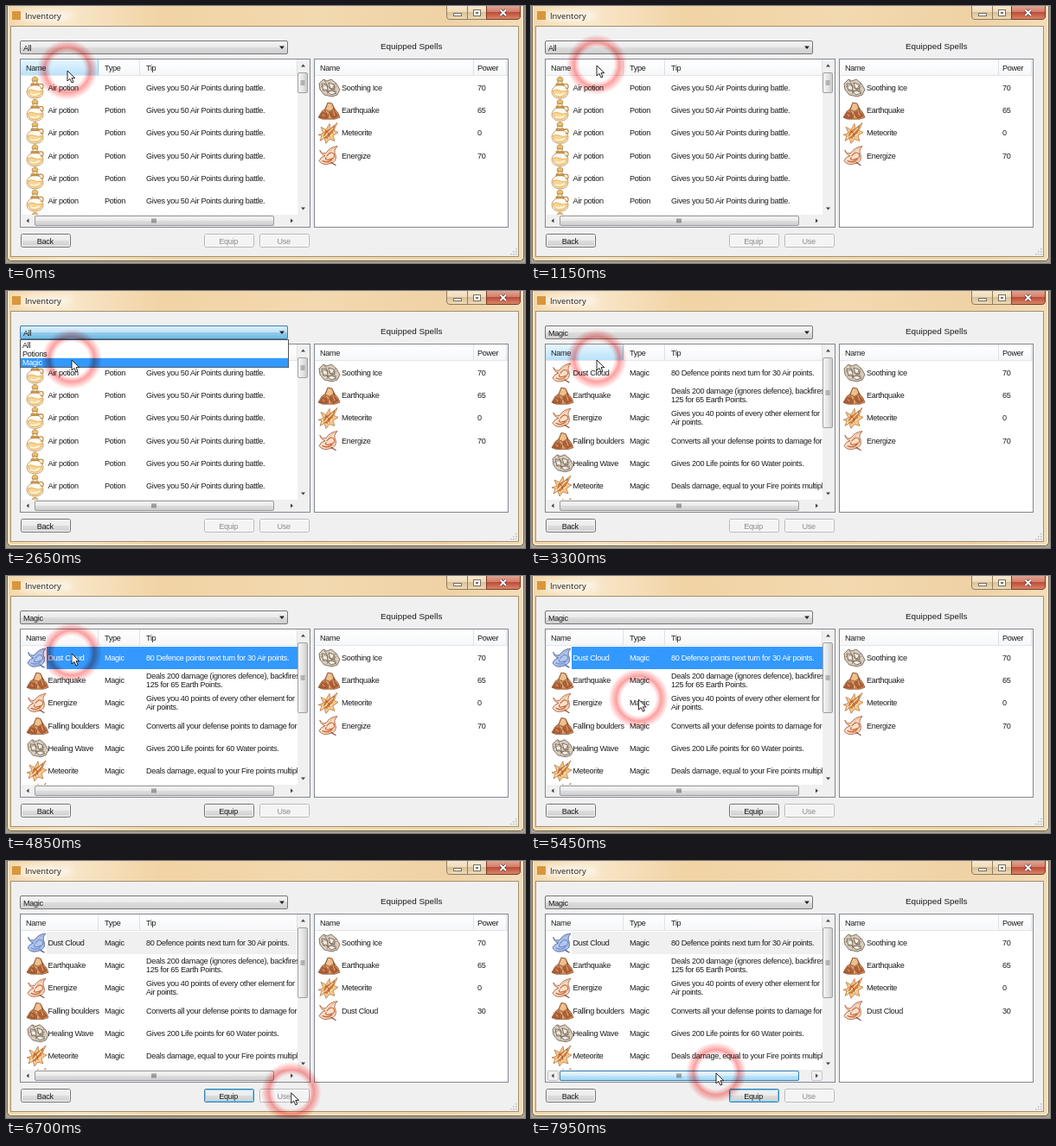
Recreate the animation shown at these times as an HTML page. Size 600 by 298 pixels, loop 8 s.

```html
<!DOCTYPE html>
<html lang="en">
<head>
<meta charset="utf-8">
<title>Inventory</title>
<style>
html, body { margin: 0; width: 100%; height: 100%; overflow: hidden; }
svg { display: block; width: 100%; height: 100%; }
text { font: 9.1px "Liberation Sans", Arial, sans-serif; letter-spacing: -.31px; fill: #1c1c1c; white-space: pre; }
.title { font: 9.4px "Open Sans", sans-serif; letter-spacing: 0; }
.label { font-size: 9.9px; letter-spacing: 0; }
.mid { text-anchor: middle; }
.off { fill: #8d8d8d; }
.lit text { fill: #fff; }
.halo { mix-blend-mode: multiply; }
</style>
</head>
<body>
<svg id="stage" viewBox="0 0 600 298" preserveAspectRatio="none">
<defs>
  <linearGradient id="glass">
    <stop stop-color="#f3d6a8"/><stop offset=".12" stop-color="#f8e6c9"/><stop offset=".3" stop-color="#f1d3a4"/>
    <stop offset=".6" stop-color="#f3d9b0"/><stop offset=".85" stop-color="#efd2a5"/><stop offset="1" stop-color="#f3ddb9"/>
  </linearGradient>
  <linearGradient id="gray" x2="0" y2="1">
    <stop stop-color="#f3f3f3"/><stop offset=".5" stop-color="#ebebeb"/><stop offset=".5" stop-color="#dddddd"/><stop offset="1" stop-color="#cfcfcf"/>
  </linearGradient>
  <linearGradient id="blue" x2="0" y2="1">
    <stop stop-color="#eaf6fd"/><stop offset=".5" stop-color="#d5edfb"/><stop offset=".5" stop-color="#bce4fb"/><stop offset="1" stop-color="#a3d5f2"/>
  </linearGradient>
  <linearGradient id="pressed" x2="0" y2="1">
    <stop stop-color="#dceffa"/><stop offset=".5" stop-color="#c0e2f5"/><stop offset=".5" stop-color="#95cdeb"/><stop offset="1" stop-color="#6fb8df"/>
  </linearGradient>
  <linearGradient id="thumbV"><stop stop-color="#f5f5f5"/><stop offset=".5" stop-color="#e6e6e6"/><stop offset="1" stop-color="#c9c9c9"/></linearGradient>
  <linearGradient id="head" x2="0" y2="1"><stop stop-color="#fff"/><stop offset="1" stop-color="#f6f7f9"/></linearGradient>
  <linearGradient id="headHot" x2="0" y2="1"><stop stop-color="#e7f6fe"/><stop offset="1" stop-color="#b9e2fa"/></linearGradient>
  <linearGradient id="caption" x2="0" y2="1"><stop stop-color="#f8ead1"/><stop offset=".5" stop-color="#eedbb9"/><stop offset=".5" stop-color="#d9c096"/><stop offset="1" stop-color="#efdcb8"/></linearGradient>
  <linearGradient id="closeRed" x2="0" y2="1"><stop stop-color="#e3ab98"/><stop offset=".5" stop-color="#d17c68"/><stop offset=".5" stop-color="#bd4a36"/><stop offset="1" stop-color="#d98a6c"/></linearGradient>
  <radialGradient id="halo">
    <stop offset=".56" stop-color="#fff"/><stop offset=".66" stop-color="#ffd0d0"/><stop offset=".74" stop-color="#ff9f9f"/>
    <stop offset=".86" stop-color="#ffcaca"/><stop offset="1" stop-color="#fff"/>
  </radialGradient>
  <filter id="tint" x="0" y="0" width="1" height="1">
    <feColorMatrix type="saturate" values=".1" result="g"/>
    <feFlood flood-color="#3399ff" flood-opacity=".45"/><feComposite in2="SourceAlpha" operator="in" result="c"/>
    <feMerge><feMergeNode in="g"/><feMergeNode in="c"/></feMerge>
  </filter>
  <filter id="soft" x="-.5" y="-1" width="2" height="3"><feGaussianBlur stdDeviation="4"/></filter>
  <clipPath id="view"><path d="M17 81H337V242H17Z"/></clipPath>

  <g id="potion" stroke="#a57834" stroke-width=".7" stroke-linejoin="round">
    <path d="M7 9.500Q0 12 0 18Q1 25 9.500 25Q18.500 25 19 18Q19 12 12 9.500Z" fill="#fffaf0"/>
    <path d="M1.500 16Q5 14 9 16T17.500 16Q18 23.500 9.500 23.500Q1.500 23.500 1.500 16Z" fill="#f8d593" stroke="#dd9f45"/>
    <path d="M4 20q5 3 11-1" fill="none" stroke="#fff3d4" stroke-width="1.800"/>
    <path d="M7 9.500V5H12V9.500Z" fill="#fdf0d0"/>
    <path d="M5 8h9v2H5Z" fill="#d9a353"/>
    <path d="M6.500 5Q5 1 9.500 0Q14 1 12.500 5Z" fill="#eebf6c"/>
    <path d="M14 9q5-2 5 2t-3 2" fill="none" stroke="#c08a40" stroke-width="1.300"/>
  </g>
  <g id="swirl" fill="none" stroke="#a65f42" stroke-width=".9" stroke-linecap="round">
    <path d="M2 7Q4 11 9 10Q13 3 22 2Q17 7 20 12Q22 20 14 22Q5 25 1 19Q3 14 8 13Q3 12 2 7Z" fill="#f9e0ca"/>
    <path d="M10 13q5-6 8-2t-4 6-5-2M5 19q7 3 11-2" stroke="#c8693f" stroke-width="1.200"/>
    <path d="M12 9q4-4 7-5M3 9l4 2M8 21q9 1 10-6" stroke="#eaa670"/>
    <path d="M15 21l5 3" stroke="#8c4a35" stroke-width="1.200"/>
  </g>
  <g id="rocks" stroke="#84492c" stroke-width=".7" stroke-linejoin="round">
    <path d="M0 21l4-7 4-3 3-7 5 1 3 6 4 5 2 5-6 2H5Z" fill="#cf8a53"/>
    <path d="M8 12l3-8 5 1 2 6-5 3Z" fill="#edbd88"/>
    <path d="M1 21l4-6 5 2 0 5ZM12 16l6-3 5 6-6 3Z" fill="#b35f35"/>
    <path d="M9 14l3 2 1 6M12 6l2 6M17 13l2 6M5 17l2 3" fill="none" stroke="#f4cf9f"/>
    <path d="M7 13l3 3M18 10l1 3M11 22l1-5" fill="none" stroke="#73321b"/>
  </g>
  <g id="ice" stroke="#65564a" stroke-width=".8" stroke-linejoin="round">
    <path d="M1 8l5-5 4 2 5-2 6 5 4 7-3 6-6 2-9-2-5-6Z" fill="#d9cdbd"/>
    <path d="M4 8l6 1 1 7-5 0ZM12 7l6 2 1 6-5-1ZM10 17l6-1 5 3-6 2Z" fill="#f1ece3"/>
    <path d="M3 12q5-4 9 0t9-1M7 4l4 7M20 8l-5 7M10 20q3-6 11-3M5 16q4-3 7 2" fill="none" stroke="#84705c"/>
  </g>
  <g id="meteor" stroke="#b06a35" stroke-width=".7" stroke-linejoin="round">
    <path d="M0 15l6-2-3-7 6 3 4-7 1 6 8-7-4 9 5 2-6 4 2 6-6-2-4 5-2-6-5 3 2-6Z" fill="#f5c98a"/>
    <path d="M6 18l2-7 6-3 5-4-3 9-5 6Z" fill="#d57c3e"/>
    <path d="M9 15l4-4 4-4M4 19l6-4M11 19l5-5" fill="none" stroke="#fdeac0" stroke-width="1.100"/>
    <path d="M8 10l4 3 1 5" fill="none" stroke="#924a22"/>
  </g>
</defs>
</svg>
<script>
const LOOP = 8000, STEP = 50, ROW = 26.2;
const svg = document.getElementById('stage');

const rect = (x, y, w, h, fill, stroke, rx = 0) =>
  `<rect x="${x}" y="${y}" width="${w}" height="${h}" fill="${fill}" rx="${rx}"${stroke ? ` stroke="${stroke}"` : ''}/>`;
const path = (d, fill, stroke = 'none', extra = '') => `<path d="${d}" fill="${fill}" stroke="${stroke}" ${extra}/>`;
const text = (x, y, s, cls = '') => `<text x="${x}" y="${y}" class="${cls}">${s}</text>`;
const icon = (name, x, y, extra = '') => `<use href="#${name}" x="${x}" y="${y}" ${extra}/>`;
const during = (spans, body, attrs = '') => `<g data-on="${spans}" ${attrs}>${body}</g>`;
const rowTop = i => 82 + ROW * i;

function frame() {
  const grip = [0, 1, 2].flatMap(i => [0, 1, 2].map(j => i + j > 1 ? rect(583 + i * 3, 281 + j * 3, 1.5, 1.5, '#bdbdbd') : ''));
  const cross = (color, width) => path('M571.5 4.5l6.500 6.500m0-6.500l-6.500 6.500', 'none', color, `stroke-width="${width}"`);
  return rect(0, 0, 600, 298, '#aaa08f')
    + path('M1.500 -2V290Q1.500 295.500 7 295.500H593Q598.500 295.500 598.500 290V-2Z', 'url(#glass)', '#6f6048')
    + path('M2.500 0V290Q2.500 294.500 7 294.500H593Q597.500 294.500 597.500 290V0', 'none', '#fbf0dc')
    + `<ellipse cx="44" cy="12" rx="34" ry="7" fill="#fff" opacity=".65" filter="url(#soft)"/>`
    + rect(5.5, 23.5, 587, 267, '#f0f0f0', '#a3906e')
    + rect(7, 6, 10, 10, '#d9963c') + text(22, 15, 'Inventory', 'title')
    + path('M509.500 -1V12Q509.500 15.500 513 15.500H555.500V-1Z', 'url(#caption)', '#8f7c5c') + path('M533.500 0V15', 'none', '#8f7c5c')
    + path('M555.500 -1V15.500H590Q594.500 15.500 594.500 12V-1Z', 'url(#closeRed)', '#7d3a2b')
    + rect(517.5, 8.5, 9, 3, '#fff', '#776e60') + rect(540.5, 4.5, 8, 7, '#fff', '#776e60') + rect(543.5, 7.5, 2, 1, 'none', '#776e60')
    + cross('#64343a', 3.4) + cross('#fff', 1.9) + grip.join('');
}

function combo() {
  const box = (fill, line) => rect(16.5, 40.5, 309, 15, fill, line, 1.5) + path('M316 46.500h6l-3 3.500Z', '#222');
  return box('url(#gray)', '#777') + during('1200-1700', box('url(#blue)', '#3c7fb1')) + during('1700-2850', box('url(#pressed)', '#3c7fb1'))
    + during('0-2850', text(20, 51.5, 'All')) + during('2850-8000', text(20, 51.5, 'Magic'));
}

function dropdown() {
  const items = ['All', 'Potions', 'Magic'], spans = ['1700-2100', '2100-2200', '2200-2850'];
  return during('1700-2850', rect(16.5, 56.5, 310, 32, '#fff', '#555') + items.map((s, i) => {
    const y = 57 + i * 10.4;
    return text(19, y + 8.5, s) + during(spans[i], rect(17, y, 309, 10.4, '#3399ff') + text(19, y + 8.5, s), 'class="lit"');
  }).join(''));
}

function listBox(x, right, columns) {
  return rect(x + .5, 61.5, right - x, 195, '#fff', '#828790') + rect(x + 1, 62, right - x - 1, 18, 'url(#head)')
    + path(`M${x + 1} 80.5H${right}`, 'none', '#e3e5e8')
    + columns.map(([at, s, line]) => text(at, 75, s) + path(`M${line} 62V80`, 'none', '#dfe1e5')).join('');
}

function item(i, name, kind, tip, pic) {
  const y = rowTop(i), lines = tip.split('|');
  return icon(pic, 24, y) + text(48.5, y + 16, name) + text(114, y + 16, kind)
    + lines.map((s, n) => text(162, y + 16 + (lines.length > 1 ? n * 10 - 5 : 0), s)).join('');
}

const magic = [
  ['Dust Cloud', '80 Defence points next turn for 30 Air points.', 'swirl'],
  ['Earthquake', 'Deals 200 damage (ignores defence), backfires|125 for 65 Earth Points.', 'rocks'],
  ['Energize', 'Gives you 40 points of every other element for|Air points.', 'swirl'],
  ['Falling boulders', 'Converts all your defense points to damage for', 'rocks'],
  ['Healing Wave', 'Gives 200 Life points for 60 Water points.', 'ice'],
  ['Meteorite', 'Deals damage, equal to your Fire points multiplied', 'meteor'],
  ['Soothing Ice', '', 'meteor']
];

function items() {
  const potions = Array.from({ length: 7 }, (_, i) => item(i, 'Air potion', 'Potion', 'Gives you 50 Air Points during battle.', 'potion'));
  const spells = magic.map(([name, tip, pic], i) => item(i, name, 'Magic', tip, pic));
  const first = item(0, magic[0][0], 'Magic', magic[0][1], 'swirl');
  const chosen = (spans, fill, cls) => during(spans,
    rect(17, 82, 320, 26, '#fff') + rect(47, 82, 290, 26, fill) + first + icon('swirl', 24, 82, 'filter="url(#tint)"'), `class="${cls}"`);
  return `<g clip-path="url(#view)">` + during('0-2900', potions.join('')) + during('2900-8000', spells.join(''))
    + chosen('4750-6300', '#3399ff', 'lit') + chosen('6300-8000', '#f0f0f0', '') + '</g>';
}

function scrollbars() {
  const vThumb = h => rect(337.5, 77.5, 11, h, 'url(#thumbV)', '#a0a0a0', 1.5)
    + [-2, 0, 2].map(d => path(`M340.5 ${77.5 + h / 2 + d}h5`, 'none', '#666', 'stroke-width=".8"')).join('');
  const hThumb = (fill, line) => rect(33.5, 243.5, 276, 11, fill, line, 1.5)
    + [-2, 0, 2].map(d => path(`M${171 + d} 246.5v5`, 'none', '#444', 'stroke-width=".9"')).join('');
  return rect(337, 62, 14, 194, '#f0f0f0') + rect(17, 242, 334, 14, '#f0f0f0')
    + path('M341 70.500h5l-2.500-3ZM341 233.500h5l-2.500 3ZM26.500 246.500v5l-3-2.500ZM329 246.500v5l3-2.500Z', '#444')
    + during('0-2900', vThumb(23)) + during('2900-8000', vThumb(81))
    + hThumb('url(#gray)', '#999')
    + during('5700-6050,7850-8000', hThumb('url(#blue)', '#3c7fb1')
      + rect(19.5, 243.5, 12, 11, 'none', '#c3c7ca', 1.5) + rect(324.5, 243.5, 12, 11, 'none', '#c3c7ca', 1.5));
}

function equipped() {
  const row = (i, name, power, pic) => icon(pic, 361, rowTop(i)) + text(388, rowTop(i) + 16, name) + text(545, rowTop(i) + 16, power);
  return listBox(356, 580, [[363, 'Name', 540.5], [545, 'Power', 578.5]])
    + row(0, 'Soothing Ice', 70, 'ice') + row(1, 'Earthquake', 65, 'rocks') + row(2, 'Meteorite', 0, 'meteor')
    + during('0-6350', row(3, 'Energize', 70, 'swirl')) + during('6350-8000', row(3, 'Dust Cloud', 30, 'swirl'));
}

function button(x, label, fill, line, cls = '') {
  return rect(x + .5, 264.5, 57, 15, fill, line, 2) + rect(x + 1.5, 265.5, 55, 13, 'none', '#fbfbfb', 1) + text(x + 28.2, 275.5, label, 'mid ' + cls);
}

function buttons() {
  const idle = (x, s) => button(x, s, '#f4f4f4', '#b5b9bc', 'off');
  return button(17, 'Back', 'url(#gray)', '#707070') + idle(229, 'Equip') + idle(293, 'Use')
    + during('4800-8000', button(229, 'Equip', 'url(#gray)', '#707070'))
    + during('6050-6600', button(229, 'Equip', 'url(#blue)', '#3c7fb1'))
    + during('6600-8000', button(229, 'Equip', 'url(#gray)', '#3c7fb1') + rect(230.5, 265.5, 55, 13, 'none', '#6fd0f4', 1));
}

svg.insertAdjacentHTML('beforeend', frame() + combo() + text(433, 50, 'Equipped Spells', 'label')
  + listBox(16, 351, [[23, 'Name', 106.5], [114, 'Type', 154.5], [162, 'Tip', 336.5]])
  + during('0-900,3000-4250', rect(17, 62, 89, 18, 'url(#headHot)') + path('M106.500 62V80', 'none', '#8ecbee') + text(23, 75, 'Name'))
  + items() + scrollbars() + equipped() + buttons() + dropdown()
  + '<circle class="halo pointer" cy="-1" r="35" fill="url(#halo)"/>'
  + path('M0 0V12L2.900 9.400L5 14L7 13.100L5 8.700H8.800Z', '#fff', '#111', 'class="pointer" stroke-width=".9" stroke-linejoin="round"'));

// Pointer stops: time, x, y
const stops = [
  [0, 71, 75], [800, 71, 75], [1000, 73, 104], [1300, 79, 34], [1600, 77.5, 51.5], [1900, 77.5, 51.5],
  [2450, 75, 118], [2650, 76, 80], [4050, 76, 80], [4250, 102, 72], [4450, 96, 97], [4600, 76, 90],
  [5150, 76, 90], [5950, 229, 258], [6000, 230, 260], [6250, 256, 272], [6450, 256, 272],
  [6800, 348, 268], [7750, 348, 268], [7950, 214, 246], [8000, 214, 246]
];
const pointer = svg.querySelectorAll('.pointer');
const parts = [...svg.querySelectorAll('[data-on]')].map(el =>
  ({ el, spans: el.dataset.on.split(',').map(s => s.split('-').map(Number)) }));

function draw(now) {
  const t = Math.floor((now % LOOP) / STEP) * STEP;
  const n = stops.findIndex(s => s[0] > t);
  const [t0, x0, y0] = stops[n - 1], [t1, x1, y1] = stops[n];
  const u = (t - t0) / (t1 - t0), e = u * u * (3 - 2 * u);
  const place = `translate(${x0 + (x1 - x0) * e} ${y0 + (y1 - y0) * e})`;
  for (const el of pointer) el.setAttribute('transform', place);
  for (const { el, spans } of parts)
    el.style.display = spans.some(([from, to]) => t >= from && t < to) ? '' : 'none';
}

const start = performance.now();
function tick() {
  draw(performance.now() - start);
  requestAnimationFrame(tick);
}
tick();
</script>
</body>
</html>
```
